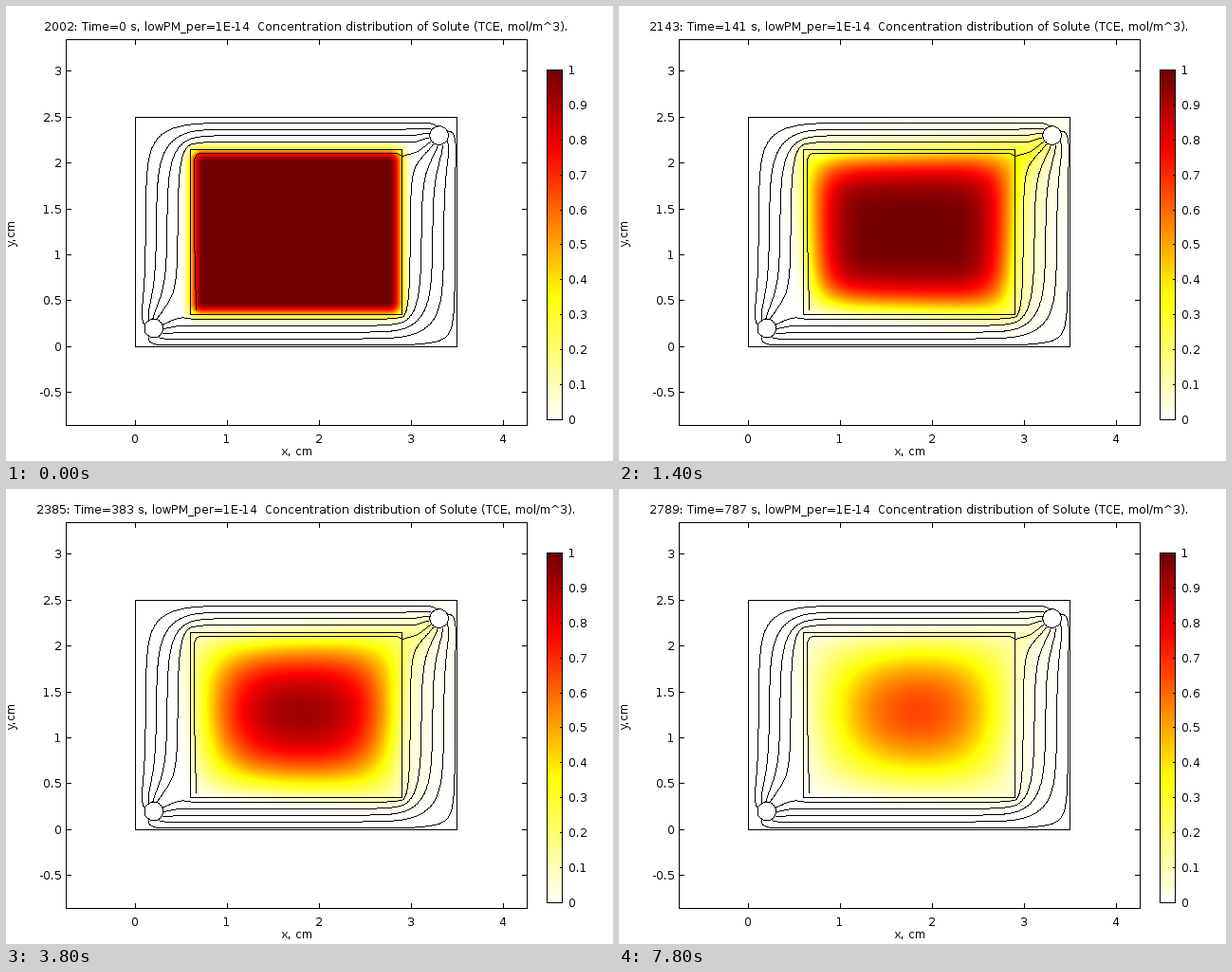
These frames come from a looping animation (640 by 480 pixels, 8000 ms). A matplotlib script:

```python
import numpy as np
import matplotlib
import matplotlib.pyplot as plt
from matplotlib.animation import FuncAnimation
from matplotlib.colors import LinearSegmentedColormap
from matplotlib.patches import Circle

matplotlib.rcParams.update({
    "font.family": "DejaVu Sans",
    "text.hinting": "native",
    "text.hinting_factor": 1,
})

W, H, DPI = 640, 480, 100
FRAMES, INTERVAL = 40, 200
STEP = 20.2                      # simulated seconds per frame
PX = 72 / DPI                    # one pixel in points

# Physical model (cm, s)
CELL, NX, NY = 0.025, 140, 100
DIFF = 2.6e-4
FLOW = 0.05                      # well rate
X0, X1, Y0, Y1 = 0.6, 2.9, 0.35, 2.15
INLET, OUTLET, WELL_R = (0.2, 0.2), (3.3, 2.3), 0.104

HEAT = LinearSegmentedColormap.from_list("heat", [
    (0, "#ffffff"), (0.36, "#ffff00"), (0.77, "#ff0000"), (1, "#700000")], N=512)


def to_px(x, y):
    return 136.4 + 97.0 * x, 360.4 - 96.9 * y


def divergence(fx, fy):
    d = np.zeros((NY, NX))
    d[:, :-1] += fx
    d[:, 1:] -= fx
    d[:-1] += fy
    d[1:] -= fy
    return d


def solve_flow(perm, source):
    """Darcy face velocities, by preconditioned conjugate gradients."""
    kx = 2 * perm[:, 1:] * perm[:, :-1] / (perm[:, 1:] + perm[:, :-1])
    ky = 2 * perm[1:] * perm[:-1] / (perm[1:] + perm[:-1])
    diag = divergence(kx, ky) * 0
    diag[:, :-1] += kx
    diag[:, 1:] += kx
    diag[:-1] += ky
    diag[1:] += ky

    def flux(p):
        return -kx * np.diff(p, axis=1), -ky * np.diff(p, axis=0)

    p = np.zeros_like(perm)
    r = source * CELL ** 2
    z = r / diag
    d, rz = z, np.sum(r * z)
    start = rz
    for _ in range(3000):
        ad = divergence(*flux(d))
        a = rz / np.sum(d * ad)
        p += a * d
        r = r - a * ad
        z = r / diag
        new = np.sum(r * z)
        if new < 1e-14 * start:
            break
        d, rz = z + new / rz * d, new
    qx, qy = flux(p)
    return qx / CELL, qy / CELL


def well(x, y, center):
    m = np.hypot(x - center[0], y - center[1]) < WELL_R
    return m / (m.sum() * CELL ** 2)


def ramp(d, half=0.12, pad=0.015):
    s = np.clip((d - pad + half) / (2 * half), 0, 1)
    return s * s * (3 - 2 * s)


def simulate(x, y, qx, qy, source):
    """Solute fields, one per frame: upwind advection plus diffusion."""
    drain = np.minimum(source, 0)
    g = DIFF / CELL
    ax, bx = np.maximum(qx, 0) + g, np.minimum(qx, 0) - g
    ay, by = np.maximum(qy, 0) + g, np.minimum(qy, 0) - g

    out = -drain
    out[:, :-1] += ax / CELL
    out[:, 1:] -= bx / CELL
    out[:-1] += ay / CELL
    out[1:] -= by / CELL
    steps = int(np.ceil(STEP * out.max() / 0.9))    # keeps the scheme stable
    dt = STEP / steps

    c = ramp(x - X0) * ramp(X1 - x) * ramp(y - Y0) * ramp(Y1 - y)
    fields = [c]
    for _ in range(FRAMES - 1):
        for _ in range(steps):
            fx = ax * c[:, :-1] + bx * c[:, 1:]
            fy = ay * c[:-1] + by * c[1:]
            c = c - dt * (divergence(fx, fy) / CELL - drain * c)
        fields.append(c)
    return fields


def sample(f, i, j):
    """Bilinear value of f at fractional column i and row j."""
    i = np.clip(i, 0, f.shape[1] - 1.001)
    j = np.clip(j, 0, f.shape[0] - 1.001)
    a, b = i.astype(int), j.astype(int)
    u, v = i - a, j - b
    return ((f[b, a] * (1 - u) + f[b, a + 1] * u) * (1 - v)
            + (f[b + 1, a] * (1 - u) + f[b + 1, a + 1] * u) * v)


def trace(seeds, qx, qy, sign, ds=0.01):
    """Follow the flow from all seeds until each reaches a well."""
    u, v = np.pad(qx, ((0, 0), (1, 1))), np.pad(qy, ((1, 1), (0, 0)))

    def heading(p):
        i, j = p / CELL
        d = np.array([sample(u, i, j - 0.5), sample(v, i - 0.5, j)])
        return sign * d / (np.hypot(*d) + 1e-12)

    p = np.array(seeds, float).T
    path = [p]
    for _ in range(700):
        gap = [np.hypot(p[0] - a, p[1] - b) for a, b in (INLET, OUTLET)]
        free = np.min(gap, axis=0) > 0.09
        p = p + ds * free * heading(p + ds / 2 * heading(p))
        path.append(p)
    return np.array(path)


fig = plt.figure(figsize=(W / DPI, H / DPI), dpi=DPI, facecolor="white")
ax = fig.add_axes([0, 0, 1, 1])
ax.axis("off")


def dots(xs, ys, z=3):
    """One crisp pixel per point."""
    ax.plot(np.floor(xs), np.floor(ys), ",", color="black", zorder=z)


def line(*pts, z=3):
    for (xa, ya), (xb, yb) in zip(pts, pts[1:]):
        n = int(max(abs(xb - xa), abs(yb - ya))) + 1
        dots(np.linspace(xa, xb, n) + 0.5, np.linspace(ya, yb, n) + 0.5, z)


def box(x0, y0, x1, y1):
    line((x0, y0), (x1, y0), (x1, y1), (x0, y1), (x0, y0))


def label(x, y, s, ha="center", **kw):
    return ax.text(x, y, s, ha=ha, fontsize=12 * PX, **{"va": "baseline", **kw})


gx, gy = np.meshgrid((np.arange(NX) + 0.5) * CELL, (np.arange(NY) + 0.5) * CELL)
inside = (gx > X0) & (gx < X1) & (gy > Y0) & (gy < Y1)
source = FLOW * (well(gx, gy, INLET) - well(gx, gy, OUTLET))
qx, qy = solve_flow(np.where(inside, 0.0012, 1.0), source)
fields = simulate(gx, gy, qx, qy, source)

left, bottom = to_px(0, 0)
right, top = to_px(3.5, 2.5)
image = ax.imshow(fields[0], origin="lower", extent=(left, right, bottom, top),
                  cmap=HEAT, vmin=0, vmax=1, interpolation="bicubic", aspect="auto")
ax.imshow(np.linspace(0, 1, 256)[:, None], origin="lower", extent=(570, 587, 438, 68),
          cmap=HEAT, vmin=0, vmax=1, interpolation="bilinear", aspect="auto")
ax.set_xlim(0, W)
ax.set_ylim(H, 0)

# Frames and ticks
box(63, 36, 549, 443)
box(136, 118, 475, 360)
box(194, 152, 417, 326)
box(570, 68, 586, 437)
for v in range(5):
    x = int(to_px(v, 0)[0])
    line((x, 443), (x, 438))
    line((x, 36), (x, 41))
    label(x, 461, str(v))
for v in np.arange(-0.5, 3.1, 0.5):
    y = int(to_px(0, v)[1])
    line((63, y), (68, y))
    line((549, y), (544, y))
    label(59, y + 4, f"{v:g}", ha="right")
for i in range(11):
    y = round(437 - 36.9 * i)
    line((584, y), (586, y))
    label(593, y + 4, f"{i / 10:g}", ha="left")

# Streamlines, evenly spaced across the channels below and above the block
seeds = ([(1.75, 0.015 + 0.071 * i) for i in range(5)]
         + [(1.75, 2.435 - 0.068 * i) for i in range(4)])
for sign in (1, -1):
    px, py = to_px(*trace(seeds, qx, qy, sign).transpose(1, 0, 2))
    dots(px.ravel(), py.ravel(), z=4)
line((200, 321), (198, 240), (198, 163), (200, 158), (203, 156), (411, 156),
     (418, 159), (434, 154), (448, 143), z=4)

ring = np.linspace(0, 2 * np.pi, 64)
for center in (INLET, OUTLET):
    cx, cy = to_px(*center)
    ax.add_patch(Circle((cx, cy), 10, fc="white", ec="none", zorder=5))
    dots(cx + 9.8 * np.cos(ring), cy + 9.8 * np.sin(ring), z=6)

label(307, 474, "x, cm")
label(7, 240, "y,cm", rotation=90, va="center")
title = label(317, 26, "")


def update(i):
    t = int(i * STEP + 1e-6)
    image.set_data(fields[i])
    title.set_text(f"{2002 + t}: Time={t} s, lowPM_per=1E-14  "
                   "Concentration distribution of Solute (TCE, mol/m^3).")
    return image, title


anim = FuncAnimation(fig, update, frames=FRAMES, interval=INTERVAL,
                     repeat=True, repeat_delay=0, blit=False)
plt.show()
```
